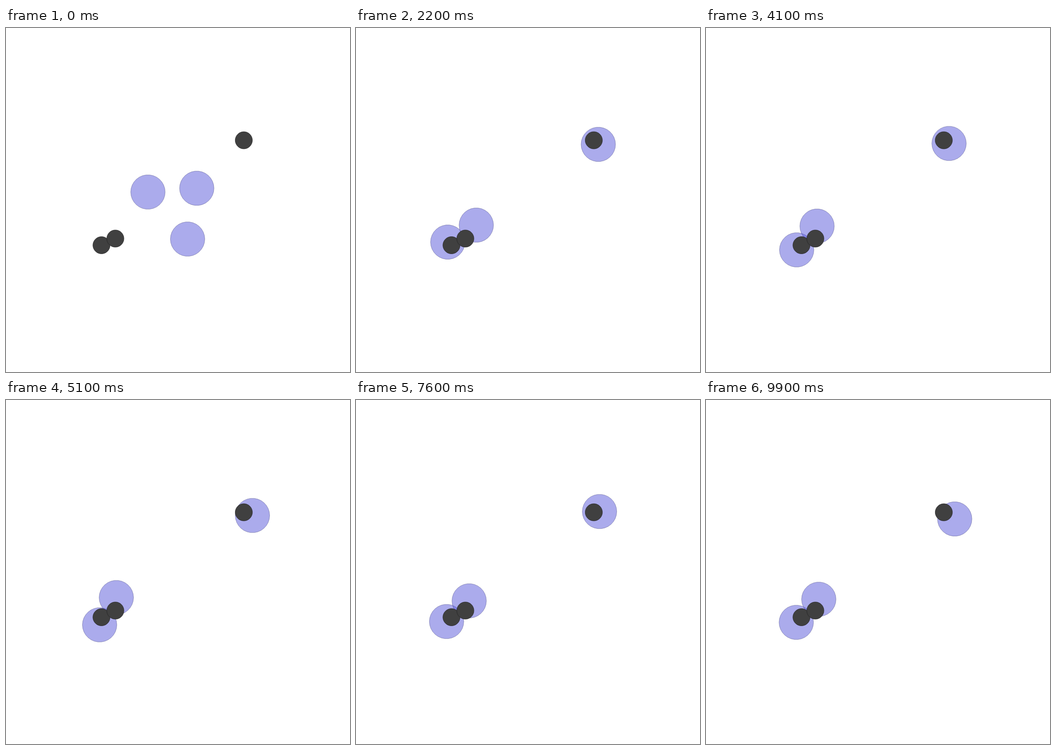
An HTML page with a canvas that plays this animation: 700 by 700 pixels, repeating every 10 s.

```html
<!DOCTYPE html>
<html lang="en">
<head>
<meta charset="utf-8">
<title>Agents and landmarks</title>
<style>
  html, body { margin: 0; width: 100%; height: 100%; overflow: hidden; background: #fff; }
  canvas { display: block; width: 700px; height: 700px; }
</style>
</head>
<body>
<canvas id="stage" width="700" height="700"></canvas>
<script>
const ctx = document.getElementById('stage').getContext('2d');
ctx.translate(.5, .5); // positions refer to pixel centres

const STEP = 100, STEPS = 100, SIDES = 30;
const ARRIVAL = 6, SWING_STEPS = 8;

const landmarks = [[193.8, 441.5], [222, 428], [483.4, 228]];

// Each agent travels to its landmark, then hovers through a few poses
const times = [0, ARRIVAL, 14, 31, 51, 65, 87, 99];
const agents = [
  { swing: 3, poses: [[288.3, 333.3], [175, 448], [195, 426], [178, 445],
    [190, 457], [182.3, 449], [185.3, 451.6], [183.2, 452]] },
  { swing: 8, poses: [[387.7, 325.6], [497, 218], [502.3, 235.3], [487.2, 234.4],
    [501, 234.5], [497.7, 227.5], [492.4, 225.4], [505.6, 241.6]] },
  { swing: 3, poses: [[369, 429], [248, 414], [260.6, 397], [227, 403.8],
    [224, 401.5], [230, 408], [229.6, 408.4], [229, 405]] }
];

function position({ poses, swing }, step) {
  let i = 0;
  while (i < times.length - 2 && times[i + 1] <= step) i++;
  const span = times[i + 1] - times[i];
  const u = (step - times[i]) / span;
  const ease = (1 - Math.cos(Math.PI * u)) / 2;
  const turns = Math.round(span / SWING_STEPS);
  const sway = step < ARRIVAL ? 0 : swing * Math.sin(2 * Math.PI * turns * u);
  const [x, y] = poses[i].map((from, axis) => from + (poses[i + 1][axis] - from) * ease);
  return [x + sway, y - sway / 2];
}

function disc([x, y], radius, fill, line) {
  ctx.beginPath();
  for (let i = 0; i < SIDES; i++) {
    const a = i * 2 * Math.PI / SIDES;
    ctx.lineTo(x + radius * Math.cos(a), y + radius * Math.sin(a));
  }
  ctx.closePath();
  ctx.fillStyle = fill;
  ctx.fill();
  ctx.strokeStyle = line;
  ctx.stroke();
}

function draw(time) {
  const step = Math.floor(time / STEP) % STEPS;
  ctx.clearRect(-1, -1, 702, 702);
  for (const agent of agents)
    disc(position(agent, step), 35, 'rgba(89,89,217,.5)', 'rgba(45,45,108,.4)');
  for (const spot of landmarks)
    disc(spot, 17.5, '#404040', 'rgba(32,32,32,.7)');
}

const start = performance.now();
function loop() {
  draw(performance.now() - start);
  requestAnimationFrame(loop);
}
loop();
</script>
</body>
</html>
```
